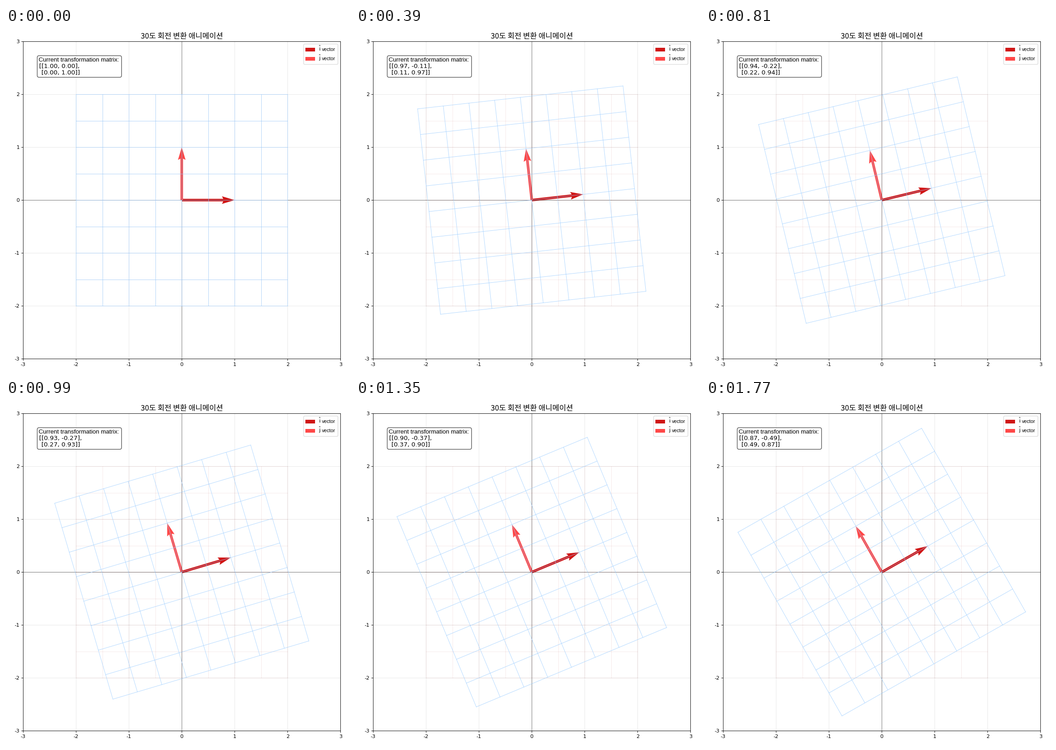
These frames come from a looping animation (748 px wide and 748 px high, 1800 ms). A matplotlib script:

```python
import numpy as np
import matplotlib.pyplot as plt
from matplotlib.animation import FuncAnimation
from matplotlib.patches import FancyBboxPatch, Rectangle

plt.rcParams["axes.unicode_minus"] = False

SIZE, DPI = 748, 80
FRAMES, INTERVAL = 60, 30
LEFT, TOP, SIDE = 37.2, 29.2, 690
I_COLOR, J_COLOR = "#d01616", "#ff4848"

angle = np.radians(30)
ROTATION = np.array([[np.cos(angle), -np.sin(angle)],
                     [np.sin(angle), np.cos(angle)]])

# End points of the grid lines, vertical ones first
steps = np.linspace(-2, 2, 9)
vertical = [np.array([[s, s], [-2, 2]]) for s in steps]
horizontal = [np.array([[-2, 2], [s, s]]) for s in steps]
SEGMENTS = vertical + horizontal

fig = plt.figure(figsize=(SIZE / DPI, SIZE / DPI), dpi=DPI, facecolor="white")
ax = fig.add_axes([LEFT / SIZE, 1 - (TOP + SIDE) / SIZE, SIDE / SIZE, SIDE / SIZE])
ax.set(xlim=(-3, 3), ylim=(-3, 3))
ax.tick_params(labelsize=10, labelfontfamily="DejaVu Sans")
ax.grid(True, alpha=0.3)
ax.axhline(0, color="k", lw=0.8, alpha=0.55)
ax.axvline(0, color="k", lw=0.8, alpha=0.55)

for seg in SEGMENTS:
    ax.plot(*seg, color="brown", alpha=0.11, lw=0.8)
moving = [ax.plot(*seg, color="#99ccff", alpha=0.78, lw=0.8)[0] for seg in SEGMENTS]


def arrow(u, v, color):
    return ax.quiver(0, 0, u, v, angles="xy", scale_units="xy", scale=1,
                     width=0.008, color=color)


i_arrow = arrow(1, 0, I_COLOR)
j_arrow = arrow(0, 1, J_COLOR)

# Overlay in pixel units, y pointing down
hud = fig.add_axes([0, 0, 1, 1])
hud.set(xlim=(0, SIZE), ylim=(SIZE, 0))
hud.axis("off")


def label(x, y, text, size, font="Liberation Sans", **kw):
    return hud.text(x, y, text, fontsize=size, family=font, va="baseline", **kw)


def box(x0, y0, x1, y1, radius, **kw):
    style = f"round,pad=0,rounding_size={radius}"
    hud.add_patch(FancyBboxPatch((x0, y0), x1 - x0, y1 - y0, boxstyle=style, **kw))


label(382.2, 23, "30도 회전 변환 애니메이션", 14.7, "Noto Sans CJK JP",
      ha="center", weight="light")

box(67.9, 60.2, 251.3, 107.2, 4, fc=(1, 1, 1, 0.8), ec=(0, 0, 0, 0.8), lw=1)
label(71.5, 73.2, "Current transformation matrix:", 11.8)
row1 = label(72, 87.2, "", 12, "DejaVu Sans")
row2 = label(77, 101.2, "", 12, "DejaVu Sans")

box(647.3, 34.8, 721.7, 79.2, 2.2, fc=(1, 1, 1, 0.8), ec=(0.8, 0.8, 0.8, 0.8), lw=1)
for y, name, color in ((50.2, "i", I_COLOR), (70.4, "j", J_COLOR)):
    hud.add_patch(Rectangle((651, y - 7.3), 21, 7.7, fc=color, ec="none"))
    label(680, y, rf"$\hat{{\mathrm{{{name}}}}}$", 10)
    label(687, y, "vector", 9.6)


def update(n):
    t = n / FRAMES
    m = (1 - t) * np.eye(2) + t * ROTATION
    for line, seg in zip(moving, SEGMENTS):
        line.set_data(*(m @ seg))
    i_arrow.set_UVC(m[0, 0], m[1, 0])
    j_arrow.set_UVC(m[0, 1], m[1, 1])
    row1.set_text(f"[[{m[0, 0]:.2f}, {m[0, 1]:.2f}],")
    row2.set_text(f"[{m[1, 0]:.2f}, {m[1, 1]:.2f}]]")
    return [*moving, i_arrow, j_arrow, row1, row2]


anim = FuncAnimation(fig, update, frames=FRAMES, interval=INTERVAL,
                     repeat=True, repeat_delay=0, blit=False)
plt.show()
```
